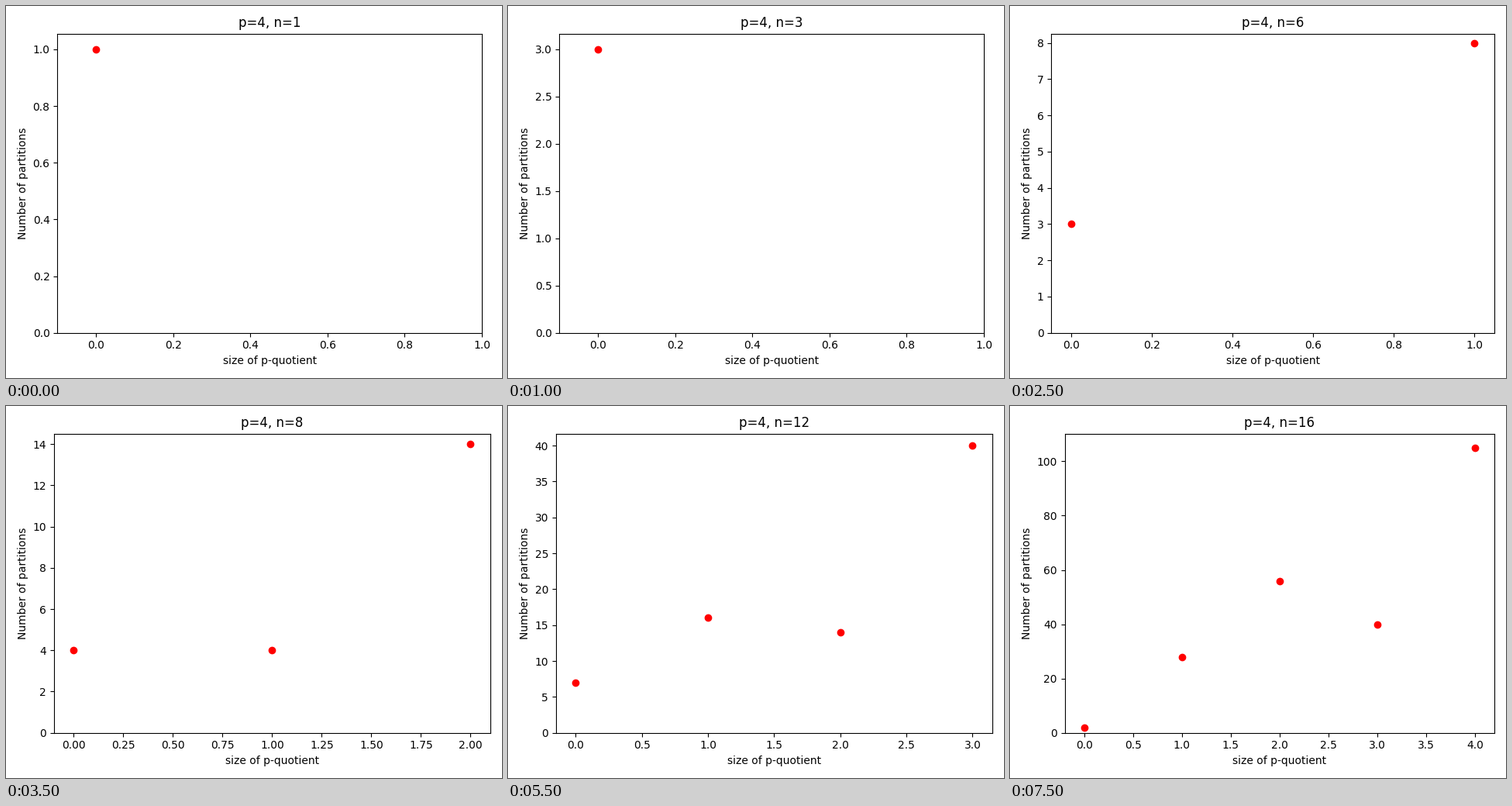
These frames come from a looping animation (640x480 px, 8 s). A matplotlib script:

```python
import matplotlib.pyplot as plt
from matplotlib.animation import FuncAnimation

P = 4
N_MAX = 16
AXES_TOP = 1 - 35.83 / 480


def multiply(series, k):
    """Multiply a power series by 1 - x^k."""
    return [c - (series[i - k] if i >= k else 0) for i, c in enumerate(series)]


def divide(series, k):
    """Divide a power series by 1 - x^k."""
    out = list(series)
    for i in range(k, len(out)):
        out[i] += out[i - k]
    return out


# cores: prod (1 - x^(pk))^p / (1 - x^k);  quotients: prod 1 / (1 - x^k)^p
cores = [1] + [0] * N_MAX
quotients = list(cores)
for k in range(1, N_MAX + 1):
    cores = divide(cores, k)
    for _ in range(P):
        cores = multiply(cores, P * k)
        quotients = divide(quotients, k)


def counts(n):
    """Number of partitions of n for each size of the p-quotient."""
    return [cores[n - P * w] * quotients[w] for w in range(n // P + 1)]


fig = plt.figure(figsize=(6.4, 4.8), dpi=100)


def update(i):
    n = i + 1
    values = counts(n)
    fig.clear()
    fig.subplots_adjust(left=0.125, right=0.9, bottom=0.11, top=0.88)
    ax = fig.add_subplot()
    ax.scatter(range(len(values)), values, color="red")
    ax.set_ylim(bottom=0)
    if len(values) == 1:
        ax.set_xlim(-0.1, 1.0)
    ax.set_title(f"p={P}, n={n}")
    ax.set_xlabel("size of p-quotient")
    ax.set_ylabel("Number of partitions")
    fig.tight_layout()
    fig.subplots_adjust(top=AXES_TOP)
    return []


anim = FuncAnimation(fig, update, frames=N_MAX, init_func=lambda: [],
                     interval=500, repeat=True, repeat_delay=0)
plt.show()
```
